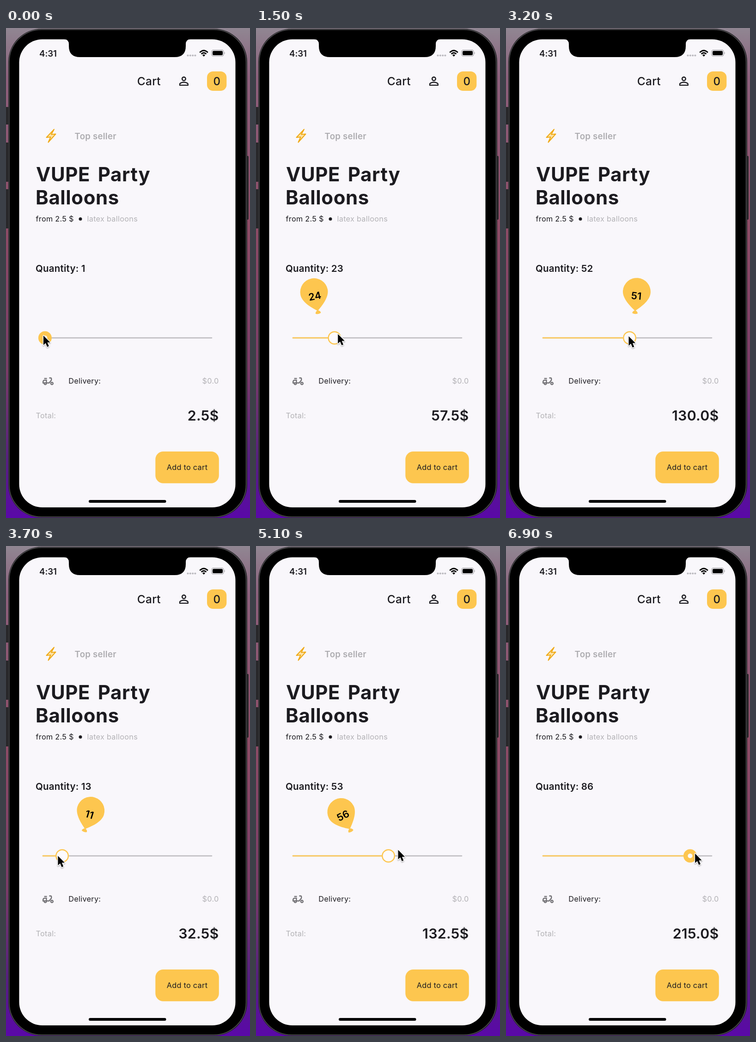
Recreate the animation shown at these times as an HTML page. Size 528 by 1061 pixels, loop 7000 ms.

```html
<!DOCTYPE html>
<html lang="en">
<head>
<meta charset="utf-8">
<title>Balloon slider</title>
<style>
  html, body { margin: 0; width: 100%; height: 100%; overflow: hidden; background: #000; }
  svg { display: block; width: 528px; height: 1061px; font-family: Inter, Roboto, sans-serif; fill: #1c1b20; }
  text { white-space: pre; }
  .small { font-size: 16.3px; letter-spacing: .27px; }
  .title { font-size: 42px; font-weight: 700; letter-spacing: .6px; }
  .medium { font-weight: 500; }
  .semi { font-weight: 600; }
  .dim { fill: #b3b2b6; }
  .accent { fill: #fdc64f; }
  .end { text-anchor: end; }
  .mid { text-anchor: middle; }
  .line { fill: none; stroke-width: 2.6; stroke-linecap: round; }
</style>
</head>
<body>
<svg viewBox="0 0 528 1061">
  <defs>
    <linearGradient id="wall" x2="0" y2="1">
      <stop offset="0" stop-color="#908692"/>
      <stop offset=".1" stop-color="#8c607c"/>
      <stop offset=".4" stop-color="#8d4c66"/>
      <stop offset=".7" stop-color="#7a3c68"/>
      <stop offset=".88" stop-color="#562080"/>
      <stop offset="1" stop-color="#5a08a8"/>
    </linearGradient>
    <filter id="shade" x="-50%" y="-50%" width="200%" height="200%">
      <feDropShadow dx="0" dy="1.5" stdDeviation="1.3" flood-opacity=".35"/>
    </filter>
  </defs>

  <!-- Phone -->
  <rect width="528" height="1061" fill="url(#wall)"/>
  <g fill="#29282b">
    <rect x="-3" y="171" width="9" height="38" rx="2"/>
    <rect x="-3" y="248" width="9" height="85" rx="2"/>
    <rect x="-3" y="349" width="9" height="85" rx="2"/>
    <rect x="518" y="277" width="7" height="138" rx="2"/>
  </g>
  <rect x="5" y="1.5" width="517" height="1059" rx="72" fill="#232225"/>
  <rect x="7" y="3.5" width="512.5" height="1055" rx="70" fill="#000" stroke="#525154" stroke-width="1.4"/>
  <rect x="28.5" y="24.5" width="468" height="1013.5" rx="50" fill="#f9f7fb"/>
  <path fill="#000" d="M126 24Q136 25 136 35V39Q136 63 160 63H365Q389 63 389 39V35Q389 25 399 24Z"/>
  <rect x="179" y="1022" width="167.5" height="6" rx="3" fill="#000"/>

  <!-- Status bar -->
  <text class="semi mid" x="91" y="61.5" font-size="18.7" letter-spacing="-.1">4:31</text>
  <g fill="#bcbbc0">
    <circle cx="393.5" cy="59.5" r="2.1"/><circle cx="398.8" cy="59.5" r="2.1"/>
    <circle cx="404.1" cy="59.5" r="2.1"/><circle cx="409.4" cy="59.5" r="2.1"/>
  </g>
  <g fill="none" stroke="#000" stroke-width="2.7">
    <path d="M419.2 53Q428 44.5 436.8 53"/>
    <path d="M422.6 56.3Q428 51.2 433.4 56.3"/>
  </g>
  <path fill="#000" d="M424.9 58.6Q428 55.8 431.1 58.6L428 61.9Z"/>
  <rect x="445" y="47.5" width="26" height="13.5" rx="4" fill="none" stroke="#9b9a9e" stroke-width="1.2"/>
  <rect x="447" y="49.5" width="22" height="9.5" rx="2.3" fill="#000"/>
  <path fill="#9b9a9e" d="M472.6 52Q475 54.2 472.6 56.6Z"/>

  <!-- Header -->
  <text class="medium" x="283.8" y="123.5" font-size="24.4" letter-spacing=".3">Cart</text>
  <path transform="translate(369.9 100) scale(1.25)" d="M12 5.9c1.16 0 2.1.94 2.1 2.1s-.94 2.1-2.1 2.1S9.9 9.16 9.9 8s.94-2.1 2.1-2.1m0 9c2.97 0 6.1 1.46 6.1 2.1v1.1H5.9V17c0-.64 3.13-2.1 6.1-2.1M12 4C9.79 4 8 5.79 8 8s1.79 4 4 4 4-1.79 4-4-1.79-4-4-4zm0 9c-2.67 0-8 1.34-8 4v3h16v-3c0-2.66-5.33-4-8-4z"/>
  <rect class="accent" x="435" y="94" width="42.3" height="42" rx="13"/>
  <text class="medium mid" x="456.2" y="123.5" font-size="24">0</text>

  <!-- Product -->
  <path d="M104 219.5L87.5 237L96.5 236L91.5 247.5L107.5 229.5L98 230.5Z" fill="#fce3a8" stroke="#f0a914" stroke-width="2" stroke-linejoin="round"/>
  <text class="semi" x="148.6" y="240.5" font-size="18.6" letter-spacing=".25" fill="#adacb0">Top seller</text>
  <text class="title" x="65" y="332">VUPE</text>
  <text class="title" x="198.8" y="332">Party</text>
  <text class="title" x="64" y="382.3">Balloons</text>
  <text class="small" x="64.5" y="419.3">from 2.5 $</text>
  <circle cx="161" cy="413.5" r="3.5"/>
  <text class="small dim" x="175.5" y="419.3">latex balloons</text>
  <text class="semi" id="quantity" x="64" y="527.5" font-size="20.5" letter-spacing=".2"></text>

  <!-- Slider -->
  <path class="line" d="M80 671H445" stroke="#bdbcc0"/>
  <path class="line" id="fill" stroke="#fdc64f"/>
  <g id="balloon">
    <path class="accent" d="M0-4.5C-9-12-30-28-30-46A30 30 0 0 1 30-46C30-28 9-12 0-4.5Z"/>
    <path class="accent" d="M0-6C-4-4.5-6.5-1-5.5 1Q0 3.4 5.5 1C6.5-1 4-4.5 0-6Z"/>
    <text class="semi mid" id="label" y="-29.5" font-size="21.5" letter-spacing=".2" fill="#000"></text>
  </g>
  <g id="thumb">
    <circle class="accent" r="14.5"/>
    <circle id="hole" fill="#fcfafd"/>
  </g>

  <!-- Order -->
  <path transform="translate(76.6 750.5) scale(1.2)" fill="#737276" fill-rule="evenodd" d="M19 7c0-1.1-.9-2-2-2h-3v2h3v2.65L13.52 14H10V9H6c-2.21 0-4 1.79-4 4v3h2c0 1.66 1.34 3 3 3s3-1.34 3-3h4.48L19 10.35V7zM4 14v-1c0-1.1.9-2 2-2h2v3H4zm3 3c-.55 0-1-.45-1-1h2c0 .55-.45 1-1 1zM5 6h5v2H5zM19 13c-1.66 0-3 1.34-3 3s1.34 3 3 3 3-1.34 3-3-1.34-3-3-3zm0 4c-.55 0-1-.45-1-1s.45-1 1-1 1 .45 1 1-.45 1-1 1z"/>
  <text class="small" x="135.2" y="770">Delivery:</text>
  <text class="small dim end" x="460.5" y="770">$0.0</text>
  <text class="small dim" x="64.5" y="844.5">Total:</text>
  <text class="semi end" id="total" x="460.5" y="850" font-size="30.3" letter-spacing=".3"></text>
  <rect class="accent" x="323.3" y="917" width="137.5" height="68.8" rx="17"/>
  <text class="small mid" x="392" y="957">Add to cart</text>

  <path id="cursor" d="M0 0V20.5L4.7 16.2L8.2 24.4L11.8 22.8L8.4 14.8H14.6Z" fill="#000" stroke="#fff" stroke-width="2.6" paint-order="stroke" stroke-linejoin="round" filter="url(#shade)"/>
</svg>
<script>
  const LOOP = 7000, STEP = 100;
  const HOME = 84;      // resting x of the thumb
  const FOLLOW = 180;   // time constant of the trailing balloon, ms
  const PRICE = 2.5;
  const drags = [
    { start: 890, time: 1360, to: 286 },
    { start: 3027, time: 900, to: 90 },
    { start: 4567, time: 900, to: 398 },
  ];
  const $ = id => document.getElementById(id);

  function ease(t, start, time) {
    const u = Math.min(1, Math.max(0, (t - start) / time));
    return u * u * (3 - 2 * u);
  }

  const thumbAt = t => drags.reduce((x, d) => x + (d.to - x) * ease(t, d.start, d.time), HOME);
  const valueAt = t => Math.round((thumbAt(t) - 80) / 3.69);

  // The balloon is pulled towards the thumb, faster the further it trails
  function trailAt(t) {
    const dt = 5;
    let x = HOME;
    for (let s = 0; s < t; s += dt) x += (thumbAt(s) - x) * dt / FOLLOW;
    return x;
  }

  function draw(t) {
    const x = thumbAt(t);
    const trail = trailAt(t);
    const lag = x - trail;
    const press = ease(t, 400, 300) - ease(t, 6100, 300);
    const quantity = valueAt(t - 20);
    const handX = 81 + (thumbAt(t + 30) - HOME) * 1.045;

    $("quantity").textContent = "Quantity: " + quantity;
    $("total").textContent = (quantity * PRICE).toFixed(1) + "$";
    $("label").textContent = valueAt(t);
    $("fill").setAttribute("d", `M80 671H${x}`);
    $("thumb").setAttribute("transform", `translate(${x + .4} 671)`);
    $("hole").setAttribute("r", 5 + 7 * press);
    $("balloon").setAttribute("transform",
      `translate(${trail - 2} ${671 - 54 * press}) rotate(${-.34 * lag}) scale(${press})`);
    $("balloon").setAttribute("opacity", press);
    $("cursor").setAttribute("transform", `translate(${handX} ${666 - .1 * lag})`);
  }

  const start = performance.now();
  function tick() {
    const t = (performance.now() - start) % LOOP;
    draw(Math.floor(t / STEP) * STEP);
    requestAnimationFrame(tick);
  }
  tick();
</script>
</body>
</html>
```
